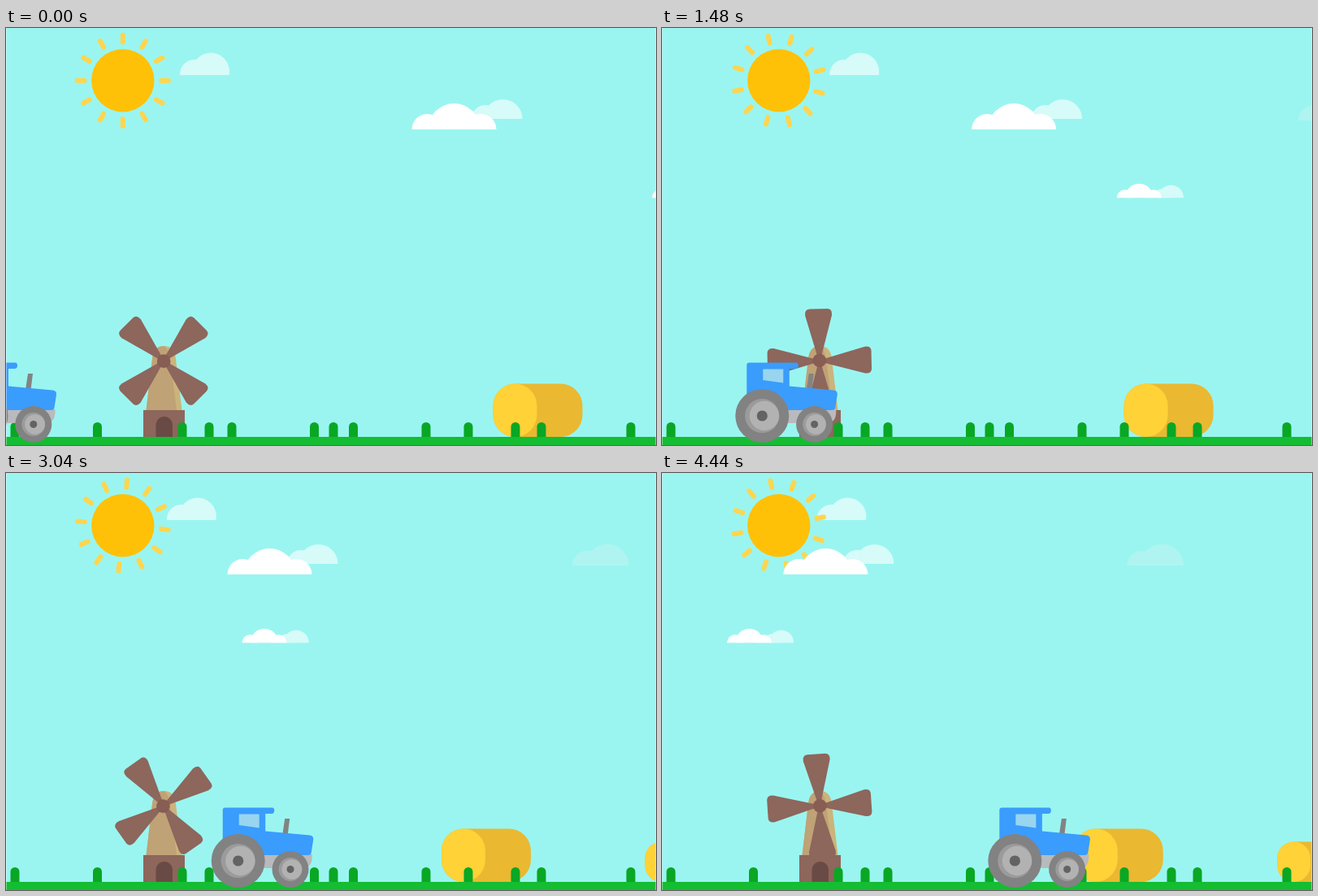
An HTML page with a canvas for the animation above (4.48 s loop, 800x514 px).

```html
<!DOCTYPE html>
<html lang="en">
<head>
<meta charset="utf-8">
<title>Farm with tractor</title>
<style>
html, body { margin: 0; width: 100%; height: 100%; overflow: hidden; background: #9af5f0; }
canvas { display: block; width: 100vw; height: 100vh; }
</style>
</head>
<body>
<canvas id="stage" width="800" height="514"></canvas>
<script>
const g = document.getElementById('stage').getContext('2d');
const LOOP = 4480, STEP = 40, SPAN = LOOP - STEP, TAU = Math.PI * 2, DEG = Math.PI / 180;
const PALE = '#d6fbf9', BROWN = '#8d665c';

// Left edge of each moving part at time t
const tractorX = t => -49.5 + .1039 * t + 3.5 * (t / SPAN) ** 6;
const baleX = t => 599.5 - .0209 * t;
const nearSunX = t => 214 - .0053 * t;
const farX = t => 913.5 - 80.7 * Math.exp(t / 3080);

// Steady at first, then slower and gathering speed
function bigX(t) {
  const s = Math.max(0, t - 1960);
  return 499.5 - .08 * (t - s) - s * (.055 + 9.25e-6 * s);
}

// Slow start, fastest midway
function smallX(t) {
  const u = t / SPAN;
  return 795 - 715 * u + u * (1 - u) * (252 - 946 * u + 696 * u * u);
}

function box(x, y, w, h, color) {
  g.fillStyle = color;
  g.fillRect(x, y, w, h);
}

function round(x, y, w, h, r, color) {
  g.fillStyle = color;
  g.beginPath();
  g.roundRect(x, y, w, h, r);
  g.fill();
}

function disc(x, y, r, color) {
  g.fillStyle = color;
  g.beginPath();
  g.arc(x, y, r, 0, TAU);
  g.fill();
}

function shape(d, color) {
  g.fillStyle = color;
  g.fill(new Path2D(d));
}

function at(x, y, draw) {
  g.save();
  g.translate(x, y);
  draw();
  g.restore();
}

// Bumps are [x, lift, radius], cut off at the cloud's flat base
function cloud(x, base, bumps, color) {
  at(x, base, () => {
    g.beginPath();
    g.rect(-10, -60, 180, 60);
    g.clip();
    for (const [bx, lift, r] of bumps) disc(bx, -lift, r, color);
  });
}

function bigCloud(x) {
  cloud(x, 112, [[90.5, 0, 17], [112, 0, 24]], PALE);
  cloud(x, 125, [[19, 0, 19], [52, 0, 32], [85, 0, 19]], '#fff');
}

function smallCloud(x) {
  cloud(x, 209.3, [[56, 0, 11], [66.7, 0, 15.5]], PALE);
  cloud(x, 209.3, [[10, 0, 10], [27.5, 0, 17.3], [45, 0, 10]], '#fff');
}

function sun(turn) {
  at(143.8, 64.7, () => {
    disc(0, 0, 38.7, '#ffc107');
    g.rotate(turn * DEG);
    for (let i = 0; i < 12; i++) {
      round(-3, -59, 6, 14.5, 2.5, '#ffd54f');
      g.rotate(30 * DEG);
    }
  });
}

function windmill(turn) {
  shape('M172.5 471L180 408Q181.5 392 194.5 392Q207.5 392 209 408L216.5 471Z', '#cbb47c');
  shape('M172.5 471L180 408Q181.5 392 194.5 392Q200 396 202 408L210 471Z', '#bfa276');
  box(169, 471, 51, 33, BROWN);
  round(184.5, 479, 20.5, 25, [10, 10, 0, 0], '#6a4a44');
  at(193.8, 410.3, () => {
    g.rotate(turn * DEG);
    for (let i = 0; i < 4; i++) {
      shape('M-2 -4L-16.4 -56Q-17.3 -63.8 -11 -64H11Q17.3 -63.8 16.4 -56L2 -4Z', BROWN);
      g.rotate(90 * DEG);
    }
    disc(.5, 0, 8.3, '#885d53');
  });
}

function bale(x, size) {
  at(x, 504, () => {
    g.scale(size, size);
    round(0, -65.5, 110, 65.5, 27, '#eab831');
    round(0, -65.5, 54, 65.5, 27, '#ffd237');
  });
}

function grass() {
  for (const x of [11, 112.5, 217, 250, 278, 379.5, 403, 427.5, 517, 569, 627, 659, 769])
    round(x - 5.5, 486, 11, 19, [5.5, 5.5, 0, 0], '#09a724');
  box(0, 504, 800, 10, '#14bd32');
}

function wheel(x, y, r) {
  disc(x, y, r, '#828282');
  disc(x, y, r * .64, '#9b9b9b');
  disc(x + r * .08, y, r * .55, '#b2b2b2');
  disc(x, y, r * .2, '#636363');
}

function tractor(x) {
  at(x, 0, () => {
    shape('M40 470H110V473Q110 487 98 487H40Z', '#b9babd');
    shape('M76.5 426H82.5L80 446H73.5Z', '#838383');
    shape('M3 412.5H61Q63.5 412.5 63.5 416Q63.5 420 60 420H52.5V441.5' +
      'L107 446.5Q112 447 111.5 452L109 468Q108.5 471 105 471H0V415.5Q0 412.5 3 412.5Z', '#3a9cfc');
    shape('M20 420.5H45V437.5L20 434Z', '#98d5ef');
    wheel(19, 478, 33);
    wheel(83.3, 488.5, 22.5);
  });
}

function paint(t) {
  box(0, 0, 800, 514, '#9af5f0');
  cloud(farX(t), 114, [[18, 0, 18], [43, 0, 26.5]], '#aff4f1');
  cloud(nearSunX(t), 58, [[18, 1, 18], [38, 4.5, 23]], PALE);
  sun(.03137 * t);
  bigCloud(bigX(t));
  smallCloud(smallX(t));
  windmill(45 + .1512 * t);
  bale(baleX(t) + 250.5, .756);
  bale(baleX(t), 1);
  grass();
  tractor(tractorX(t));
  // Soft light rim at both sides
  for (const x of [0, 799]) box(x, 0, 1, 514, 'rgba(255,255,255,.4)');
}

const start = performance.now();

function tick() {
  const t = (performance.now() - start) % LOOP;
  paint(Math.floor(t / STEP) * STEP);
  requestAnimationFrame(tick);
}

tick();
</script>
</body>
</html>
```
